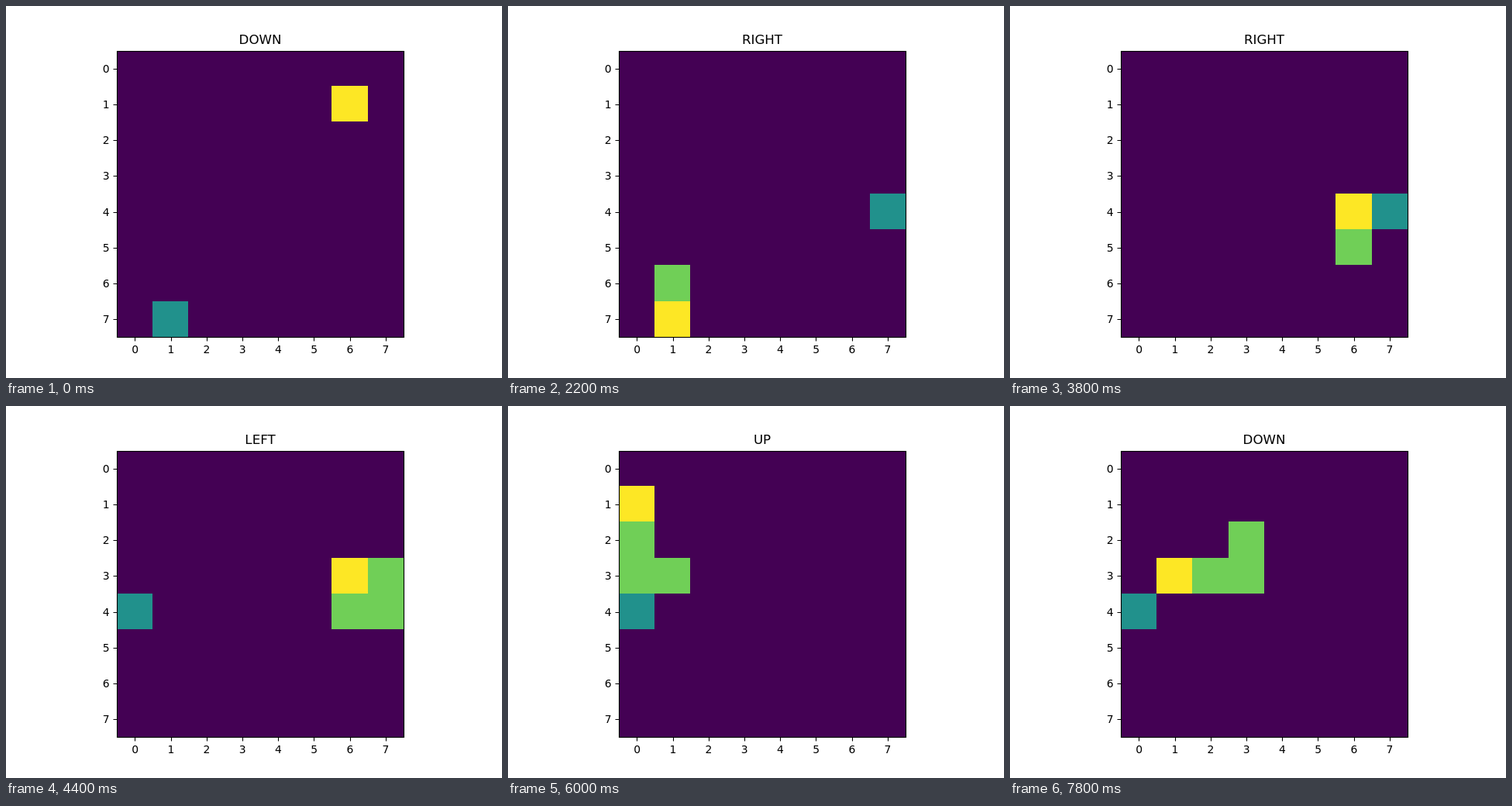
Write an HTML page that moves like this. It is 640 px wide and 480 px high and loops after 8 s.

```html
<!DOCTYPE html>
<html lang="en">
<head>
<meta charset="utf-8">
<title>Snake grid</title>
<style>
  html, body { margin: 0; width: 100%; height: 100%; overflow: hidden; background: #fff; }
  svg { display: block; width: 640px; height: 480px; }
  text { font-family: "DejaVu Sans", sans-serif; font-size: 13.889px; fill: #000; }
  #title { font-size: 16.667px; text-anchor: middle; }
  .row { text-anchor: end; }
  .col { text-anchor: middle; }
  .line { fill: none; stroke: #000; stroke-width: 1.11; }
  #cells { shape-rendering: crispEdges; }
</style>
</head>
<body>
<svg viewBox="0 0 640 480">
  <rect x="143" y="58" width="370" height="369" fill="#440154"/>
  <g id="cells"></g>
  <g id="axes"><rect class="line" x="143.5" y="58.5" width="370" height="369"/></g>
  <text id="title" x="328" y="49"></text>
</svg>
<script>
const STEP_MS = 200;
const MOVES = "DDDDLLLLLDDRRUURRRURULLLLLLLUUURRRDDDLLD";
const FOODS = [[1, 7], [7, 4], [6, 3], [0, 4]];
const DELTA = { U: [0, -1], D: [0, 1], L: [-1, 0], R: [1, 0] };
const NAMES = { U: "UP", D: "DOWN", L: "LEFT", R: "RIGHT" };
const IGNORED = { 36: "U" }; // a reversal is announced but not carried out
const COLORS = { head: "#fde725", body: "#70cf57", food: "#21918c" };

const cells = document.getElementById("cells");
const axes = document.getElementById("axes");
const title = document.getElementById("title");

function add(parent, tag, attrs, text = "") {
  const node = document.createElementNS(parent.namespaceURI, tag);
  for (const key in attrs) node.setAttribute(key, attrs[key]);
  node.textContent = text;
  parent.append(node);
}

function drawAxes() {
  for (let i = 0; i < 8; i++) {
    const x = 143.2 + 46.2 * (i + 0.5);
    const y = 57.6 + 46.2 * (i + 0.5);
    const tickX = Math.round(x) + 0.5;
    const tickY = Math.round(y) + 0.5;
    add(axes, "path", { class: "line", d: `M${tickX} 427.5v5M143.5 ${tickY}h-5` });
    add(axes, "text", { class: "col", x: x + 0.3, y: 448 }, i);
    add(axes, "text", { class: "row", x: 133.7, y: Math.round(y + 5) }, i);
  }
}

function simulate() {
  let snake = [[6, 1]];
  let eaten = 0;
  return [...MOVES].map((move, step) => {
    const state = { snake, food: FOODS[eaten], label: NAMES[IGNORED[step] || move] };
    const [dx, dy] = DELTA[move];
    const head = [snake[0][0] + dx, snake[0][1] + dy];
    const ate = String(head) === String(FOODS[eaten]) && eaten < FOODS.length - 1;
    if (ate) eaten++;
    snake = [head, ...(ate ? snake : snake.slice(0, -1))];
    return state;
  });
}

const edge = (start, i) => Math.ceil(start + 46.25 * i - 0.5);

function drawCell([col, row], fill) {
  const x = edge(143, col);
  const y = Math.max(58, edge(57, row));
  add(cells, "rect", {
    x, y, fill,
    width: edge(143, col + 1) - x,
    height: edge(57, row + 1) - y
  });
}

function show({ snake, food, label }) {
  cells.replaceChildren();
  drawCell(food, COLORS.food);
  snake.forEach((cell, i) => drawCell(cell, i ? COLORS.body : COLORS.head));
  title.textContent = label;
}

const states = simulate();
let shown = -1;

function tick() {
  const step = Math.floor(performance.now() / STEP_MS) % states.length;
  if (step !== shown) show(states[shown = step]);
  requestAnimationFrame(tick);
}

drawAxes();
tick();
</script>
</body>
</html>
```
